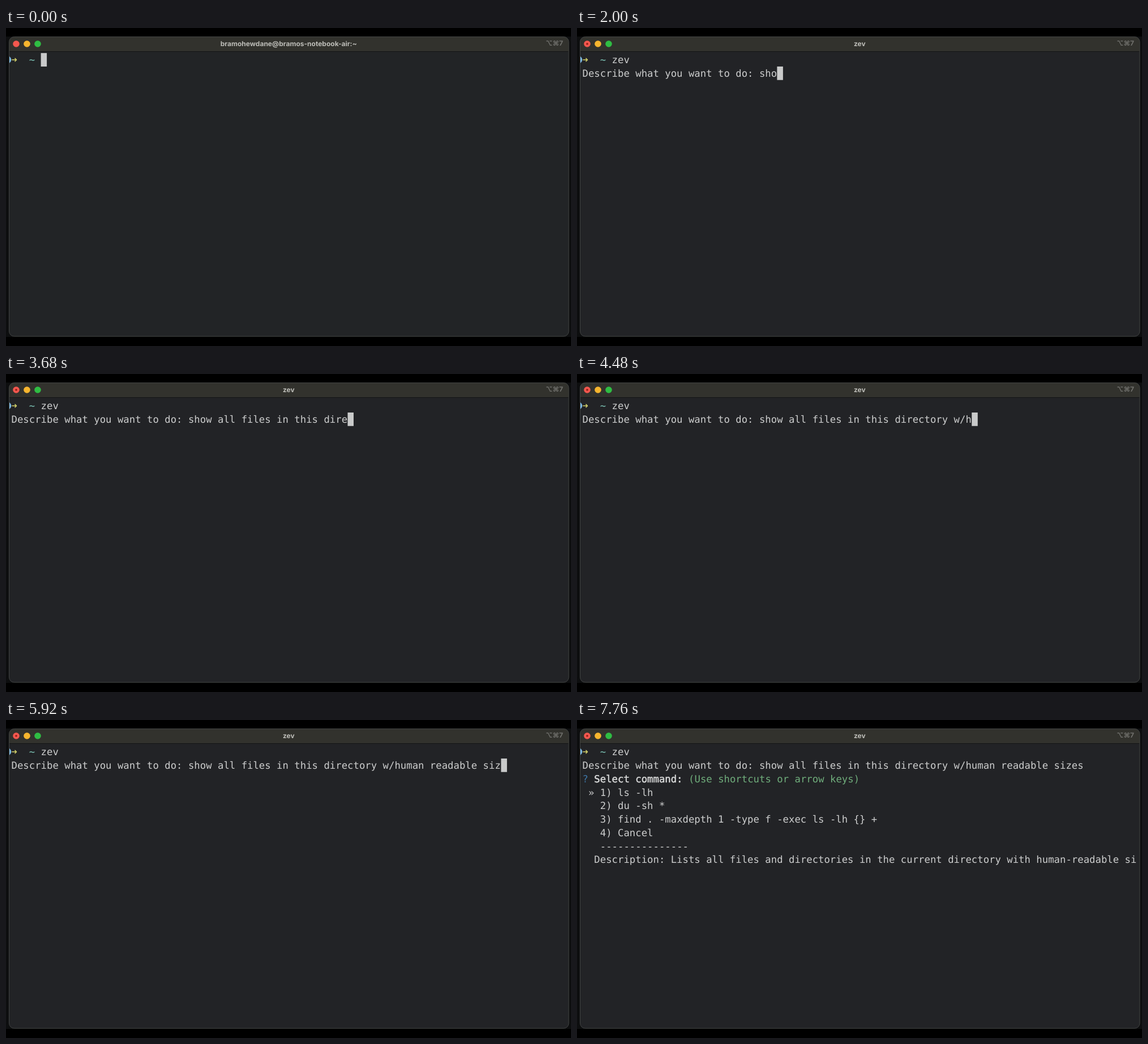
Animation, 998 px wide and 561 px high, one loop 8000 ms. Source, as an HTML page:

```html
<!DOCTYPE html>
<html lang="en">
<head>
<meta charset="utf-8">
<title>Terminal</title>
<style>
  html, body { margin: 0; width: 100%; height: 100%; overflow: hidden; background: #000; }
  svg { display: block; width: 100vw; height: 100vh; }
  text { white-space: pre; text-rendering: geometricPrecision; }
  .mono { font: 17.31px "DejaVu Sans Mono", monospace; fill: #cdcece; }
  .strong { fill: #dadbdb; stroke: #dadbdb; stroke-width: .5px; }
  .ui { font: 700 12px Inter, sans-serif; }
</style>
</head>
<body>
<svg viewBox="0 0 998 561">
  <rect width="998" height="561" fill="#000"/>
  <rect y="15" width="998" height="530" fill="#0d0e0f"/>
  <rect id="pane" x="5.5" y="15.5" width="988.5" height="528.5" rx="9" fill="#222426"/>
  <path d="M5.5 41V24.5a9 9 0 0 1 9-9H985a9 9 0 0 1 9 9V41z" fill="#32322d"/>
  <path d="M6 41.5H993.5" stroke="#131415"/>
  <rect x="5.5" y="15.5" width="988.5" height="528.5" rx="9" fill="none" stroke="#424443"/>
  <circle cx="18" cy="28" r="5.8" fill="#f3574e"/>
  <circle id="busy" cx="18" cy="28" r="1.8" fill="#8c1a14"/>
  <circle cx="37" cy="28" r="5.8" fill="#f6b52e"/>
  <circle cx="56" cy="28" r="5.8" fill="#2fbd43"/>
  <text id="title" class="ui" x="499.3" y="32" text-anchor="middle" fill="#bdbdb8"></text>
  <text class="ui" x="984" y="31.3" text-anchor="end" fill="#71716d">⌥⌘7</text>
  <path d="M6 50Q9.4 53 9.4 56T6 62z" fill="#7db9e3"/>
  <g id="screen"></g>
  <rect id="cursor" width="10.5" height="23.8" fill="#c9caca"/>
</svg>
<script>
const LOOP = 8000, STEP = 80;
const LEFT = 9.5, CELL = 10.421, TOP = 44.2, LINE = 23.75, BASE = 18.2;
const ENTER = 880, PROMPT = 1440, SUBMIT = 6160, MENU = 7280;
const COMMAND = "zev";
const ASK = "Describe what you want to do: ";
const REQUEST = "show all files in this directory w/human readable sizes";

// [time, characters typed], linear between entries
const commandKeys = [[160, 0], [320, 1], [480, 2], [640, 3]];
const requestKeys = [
  [1760, 0], [2640, 13], [3120, 23], [3280, 23], [3360, 24], [3680, 27],
  [3760, 27], [3840, 28], [4640, 39], [4720, 39], [4800, 40], [5280, 45], [6000, 55]
];

const $ = id => document.getElementById(id);
const screen = $("screen"), cursor = $("cursor"), title = $("title");
const colX = col => LEFT + col * CELL;
const rowY = row => TOP + row * LINE;

function put(row, col, str, color, extra = "") {
  const el = document.createElementNS("http://www.w3.org/2000/svg", "text");
  el.setAttribute("class", "mono " + extra);
  el.setAttribute("x", colX(col));
  el.setAttribute("y", rowY(row) + BASE);
  if (color) el.style.fill = color;
  el.textContent = str;
  screen.append(el);
  return el;
}

put(0, 0, "➜", "#cdcc69");
put(0, 3, "~", "#7fcabb");
const commandText = put(0, 5, "");
const askText = put(1, 0, "");
const menu = [
  put(2, 0, "?", "#3f78a8"),
  put(2, 2, "Select command:", "", "strong"),
  put(2, 18, "(Use shortcuts or arrow keys)", "#70ae7c"),
  put(3, 1, "»"),
  put(3, 3, "1) ls -lh"),
  put(4, 3, "2) du -sh *"),
  put(5, 3, "3) find . -maxdepth 1 -type f -exec ls -lh {} +"),
  put(6, 3, "4) Cancel"),
  put(7, 3, "-".repeat(15)),
  put(8, 2, "Description: Lists all files and directories in the current directory with human-readable si")
];

function typed(keys, t) {
  if (t <= keys[0][0]) return keys[0][1];
  for (let i = 1; i < keys.length; i++) {
    const [t0, n0] = keys[i - 1], [t1, n1] = keys[i];
    if (t <= t1) return Math.floor(n0 + (n1 - n0) * (t - t0) / (t1 - t0) + 1e-6);
  }
  return keys[keys.length - 1][1];
}

const show = (el, on) => { el.style.visibility = on ? "visible" : "hidden"; };

function draw(time) {
  const t = Math.floor(time % LOOP / STEP) * STEP;
  const running = t >= ENTER;
  const cmd = COMMAND.slice(0, typed(commandKeys, t));
  const ask = t < PROMPT ? "" : ASK + REQUEST.slice(0, typed(requestKeys, t));

  commandText.textContent = cmd;
  askText.textContent = ask;
  title.textContent = running ? COMMAND : "bramohewdane@bramos-notebook-air:~";
  $("pane").setAttribute("fill", running ? "#222326" : "#222426");
  show($("busy"), running);
  menu.forEach(el => show(el, t >= MENU));

  const row = !running ? 0 : t < SUBMIT ? 1 : 2;
  const col = [5 + cmd.length, ask.length, 0][row];
  cursor.setAttribute("x", colX(col));
  cursor.setAttribute("y", rowY(row));
  show(cursor, t < MENU);
}

function tick() {
  draw(performance.now());
  requestAnimationFrame(tick);
}
tick();
</script>
</body>
</html>
```
